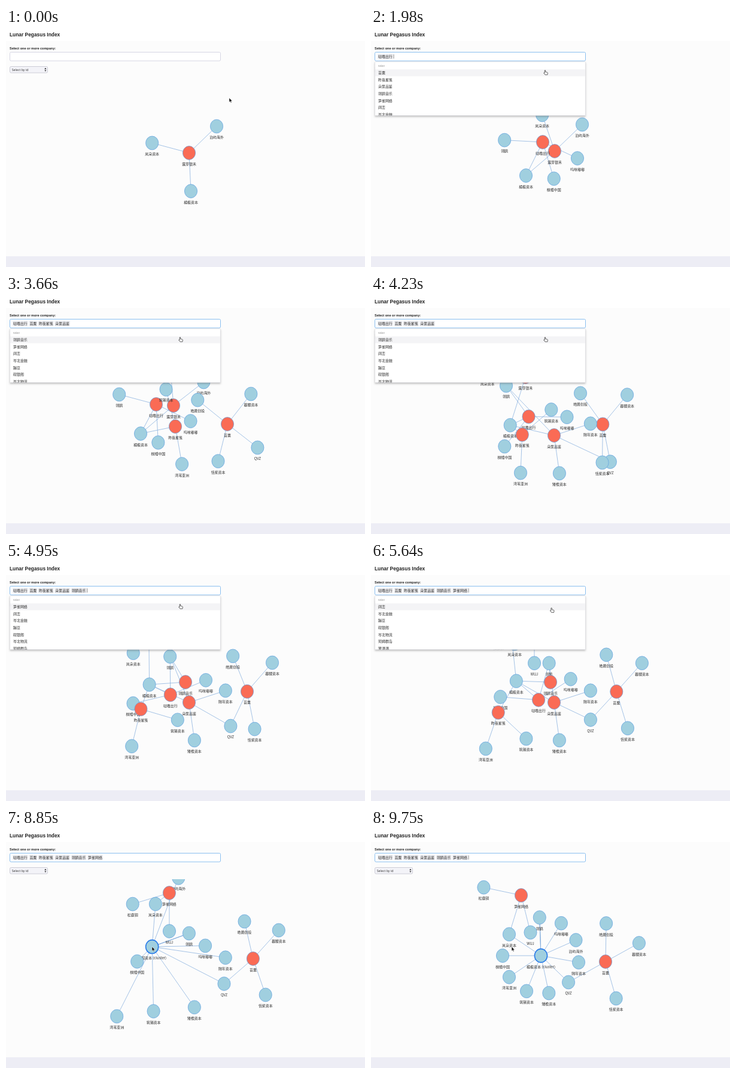
An HTML page that plays this animation: 600 px wide and 400 px high, repeating every 9780 ms.

```html
<!DOCTYPE html>
<html lang="en">
<head>
<meta charset="utf-8">
<title>Investor network</title>
<style>
html, body { margin: 0; width: 100%; height: 100%; overflow: hidden; background: #fcfcfc; }
svg { display: block; width: 600px; height: 400px; }
text { font: 5.95px "Noto Sans CJK SC", "Noto Sans CJK", "Noto Sans", sans-serif; fill: #2c2c2c; }
.title { font: bold 8.4px "Liberation Sans", sans-serif; fill: #222; }
.caption { font: bold 5.5px "Liberation Sans", sans-serif; fill: #222; }
.small { font-size: 4.3px; fill: #888; }
.select { font: 5.3px "Open Sans", "Noto Sans CJK SC", sans-serif; }
.label { text-anchor: middle; }
</style>
</head>
<body>
<svg viewBox="0 0 600 400">
  <defs>
    <clipPath id="view"><rect y="84" width="600" height="298"/></clipPath>
    <clipPath id="menuClip"><rect x="6" y="56" width="353" height="90.5"/></clipPath>
    <filter id="shadow" x="-5%" y="-5%" width="110%" height="120%">
      <feDropShadow dx="0" dy="2" stdDeviation="1.5" flood-color="#555" flood-opacity=".35"/>
    </filter>
  </defs>
  <rect width="600" height="400" fill="#fcfcfc"/>
  <rect width="600" height="22" fill="#fff"/>
  <rect y="382" width="600" height="18" fill="#ededf5"/>
  <text class="title" x="6" y="14.3">Lunar Pegasus Index</text>
  <text class="caption" x="6" y="36">Select one or more company:</text>
  <g clip-path="url(#view)"><g id="edges"></g><g id="nodes"></g></g>
  <rect x="6.5" y="64.5" width="63" height="10.5" rx="2" fill="#f3f3f8" stroke="#bcbcc8" stroke-width=".7"/>
  <text id="select" class="select" x="9.7" y="71.8"></text>
  <path d="M64.3 69l1.6-2.4 1.6 2.4zM64.3 70.4l1.6 2.4 1.6-2.4z" fill="#333"/>
  <rect id="field" x="6.5" y="40.5" width="352" height="14.5" rx="2" fill="#fff" stroke-width=".9"/>
  <g id="tokens"></g>
  <path id="caret" stroke="#444" stroke-width=".6"/>
  <g id="menu">
    <rect x="6.5" y="56.5" width="352" height="90" rx="1" fill="#fff" stroke="#d4d4d8" stroke-width=".6" filter="url(#shadow)"/>
    <rect x="7" y="69.3" width="351" height="11.4" fill="#f4f4f6"/>
    <text class="small" x="12" y="65.3">value</text>
    <g id="items" clip-path="url(#menuClip)"></g>
  </g>
  <path id="arrow" d="M0 0v7.2l1.7-1.5 1.1 2.5 1.2-.5-1.1-2.5h2.3z" fill="#111" stroke="#fff" stroke-width=".5"/>
  <path id="hand" d="M-.8 0q.8-.9 1.5 0v2.6l3 .7q.8.3.7 1.1l-.5 2.8h-4l-2.2-2.9q.1-1 1.5-.1z" fill="#fff" stroke="#222" stroke-width=".7"/>
</svg>
<script>
const LOOP = 9780, OPEN = 750, CLOSE = 5950, MERGE = 8850;
const CORE = "橘椴资本", CHOSEN = "苔粟";
const chosenSpan = [7200, 8250];
const picks = [1400, 2250, 2850, 3600, 4500, 5190];
const GRAPH_DELAY = 130, REACH = 64;

// The layout relaxes in phases of [start, end].
const phases = [[0, 1], [1530, 1980], [2380, 3660], [3730, 6900], [MERGE, 9700]];

const options = ["哒噜出行", "苔粟", "昨夜星笺", "朵筐品鉴", "翎鸥音乐", "笋雀网络", "阔峦",
  "岑北金融", "蹦豆", "砚银阁", "岑北物流", "珂姆群岛", "箩满满"];

// Hub positions and investor angles hold one value per phase, from birth on.
const companies = [
  ["露芽银禾", [[306, 209], [307, 206], [280, 185], [226, 66]],
    { 岚朵资本: [195, 251, 265, 68], 泊屿海外: [-44, -44, -38, 14] }, [CORE]],
  ["哒噜出行", [[287, 191], [251, 183], [282, 234]],
    { 翎鸥: [183, 195, 292], 棋幡中国: [73, 87, 191], 呜咪嘟嘟: [25, 26, -37] }, [CORE]],
  ["苔粟", [[370, 216], [413, 217], [392, 222]],
    { 皓蕨创投: [219, 257, 271], 暮鲤资本: [308, 312, 331], QVZ: [38, 139], 恬桨资本: [104, 71, 74] }, []],
  ["昨夜星笺", [[283, 220], [208, 254]],
    { 筑锡资本: [256, 413], 湾苇亚洲: [80, 111] }, [CORE]],
  ["朵筐品鉴", [[306, 235]], { 矮檐资本: [82], 隔年资本: [-18] }, [CORE, "翎鸥", "QVZ"]],
  ["翎鸥音乐", [[300, 201]], {}, [CORE, "翎鸥"]],
  ["笋雀网络", [[273, 107], [251, 111]], { 松鹿铜: [163, 192], WUJ: [90, 76] }, ["岚朵资本"]]
];
const corePath = [[309, 273], [259, 247], [225, 232], [244, 197], [284, 212]];
const survivors = [CHOSEN, "笋雀网络"];

// Clockwise order around the cluster.
const ring = ["翎鸥", "呜咪嘟嘟", "泊屿海外", "隔年资本", "QVZ", "矮檐资本", "筑锡资本",
  "湾苇亚洲", "棋幡中国", "岚朵资本"];
const ringAngle = name => -92 + 34 * ring.indexOf(name);

const $ = id => document.getElementById(id);
const clamp = u => Math.min(1, Math.max(0, u));
const easeOut = u => 1 - (1 - clamp(u)) ** 3;
const smooth = u => u * u * (3 - 2 * u);
const mix = (a, b, u) => Array.isArray(a) ? a.map((v, i) => mix(v, b[i], u)) : a + (b - a) * u;
const phaseAt = t => phases.findLastIndex(([start]) => start <= t);
const show = (el, on) => el.setAttribute("visibility", on ? "inherit" : "hidden");

function polar([x, y], degrees, radius) {
  const a = degrees * Math.PI / 180;
  return [x + radius * Math.cos(a), y + radius * Math.sin(a)];
}
function set(el, attrs) {
  for (const key in attrs) el.setAttribute(key, attrs[key]);
  return el;
}
function add(parent, tag, attrs, text = "") {
  const el = document.createElementNS("http://www.w3.org/2000/svg", tag);
  el.textContent = text;
  parent.append(set(el, attrs));
  return el;
}

const nodes = {}, edges = [];

function addNode(name, born, values, hub) {
  const group = add($("nodes"), "g", {});
  nodes[name] = {
    name, born, values, hub, group,
    isCompany: !hub && name !== CORE,
    disc: add(group, "ellipse", { rx: 10.6, ry: 11.4 }),
    label: add(group, "text", { class: "label", y: 20.6 }, name)
  };
}
addNode(CORE, 0, corePath);
companies.forEach(([hub, path, investors, known], i) => {
  const born = i ? picks[i - 1] + GRAPH_DELAY : 0;
  addNode(hub, born, path);
  for (const name in investors) addNode(name, born, investors[name], hub);
  for (const name of [...Object.keys(investors), ...known])
    edges.push({ hub, name, line: add($("edges"), "line", {}) });
});

const touches = (edge, test) => test(edge.hub) || test(edge.name);
const isChosen = name => name === CHOSEN;
const near = name => edges.some(e => touches(e, n => n === name) && touches(e, isChosen));
const second = name => edges.some(e => touches(e, n => n === name) && touches(e, near));
const absorbed = name => nodes[name].isCompany && !survivors.includes(name);

function track({ values, born }, t) {
  const k = phaseAt(t), first = phaseAt(born);
  const value = i => values[Math.min(Math.max(i - first, 0), values.length - 1)];
  const [start, end] = phases[k];
  return mix(value(k - 1), value(k), easeOut((t - start) / (end - start)));
}

function place(node, t) {
  if (!node.hub) return track(node, t);
  const grown = node.born ? easeOut((t - node.born) / 500) : 1;
  const home = polar(track(nodes[node.hub], t), track(node, t), REACH * mix(.4, 1, grown));
  if (t < MERGE || !ring.includes(node.name)) return home;
  const [start, end] = phases.at(-1);
  return mix(home, polar(corePath.at(-1), ringAngle(node.name), REACH),
    easeOut((t - start) / (end - start)));
}

function nodeStyle(node, merged, dim) {
  if (dim && isChosen(node.name)) return { fill: "#d2e5ff", stroke: "#2b7ce9", "stroke-width": .9 };
  if (dim && !near(node.name)) return { fill: "#dadada", stroke: "#d6d6d6", "stroke-width": .5 };
  const active = merged && node.name === CORE;
  return {
    fill: node.isCompany ? "#fa6b55" : "#a0cfdf",
    stroke: active ? "#2b7ce9" : "#5f9fe0",
    "stroke-width": active ? 1.6 : .7
  };
}

function edgeStyle(edge, dim) {
  if (dim && touches(edge, isChosen)) return { stroke: "#2f78d0", "stroke-width": 1.3 };
  if (dim && !touches(edge, near)) return { stroke: "#e6e6e6", "stroke-width": .7 };
  return { stroke: "#7fa9dc", "stroke-width": .7 };
}

function drawGraph(t) {
  const merged = t >= MERGE;
  const dim = t >= chosenSpan[0] && t < chosenSpan[1];
  for (const node of Object.values(nodes)) {
    node.at = place(node, t);
    show(node.group, t >= node.born && !(merged && absorbed(node.name)));
    set(node.group, { transform: `translate(${node.at})` });
    set(node.disc, nodeStyle(node, merged, dim));
    show(node.label, !dim || near(node.name) || second(node.name));
  }
  nodes[CORE].label.textContent = CORE + (merged ? " (cluster)" : "");
  for (const edge of edges) {
    const hub = merged && absorbed(edge.hub) ? CORE : edge.hub;
    const [x1, y1] = nodes[hub].at, [x2, y2] = nodes[edge.name].at;
    show(edge.line, t >= nodes[edge.hub].born && hub !== edge.name);
    set(edge.line, { x1, y1, x2, y2, ...edgeStyle(edge, dim) });
  }
  $("select").textContent = dim ? CHOSEN : "Select by id";
}

let tokenX = 12;
const tokens = picks.map((_, i) => {
  const group = add($("tokens"), "g", {});
  const width = options[i].length * 5.95;
  add(group, "rect", { x: tokenX - 1, y: 43.3, width: width + 2, height: 9, rx: 1, fill: "#efeff2" });
  add(group, "text", { x: tokenX, y: 49.8 }, options[i]);
  tokenX += width + 3.6;
  return { group, end: tokenX - 1.4 };
});
const rows = Array.from({ length: 7 }, (_, i) => add($("items"), "text", { x: 12, y: 77.1 + i * 11.6 }));

function drawForm(t) {
  const count = picks.filter(p => p <= t).length;
  const focused = t >= OPEN;
  set($("field"), { stroke: focused ? "#7db8ee" : "#d2d2e0" });
  tokens.forEach((token, i) => show(token.group, i < count));
  rows.forEach((row, i) => row.textContent = options[count + i]);
  show($("menu"), focused && t < CLOSE);
  const since = t - (count ? picks[count - 1] + 100 : OPEN);
  const x = count ? tokens[count - 1].end : 12;
  set($("caret"), { d: `M${x} 44.2v7` });
  show($("caret"), focused && since >= 0 && since % 1000 < 500);
}

// Pointer stops: arrival time and place.
const MOVE = 400;
const stops = [[0, 373, 117], [720, 291, 47], [1150, 291, 71], [5950, 372, 118],
  [7050, 416, 215], [8200, 345, 165], [8700, 244, 197], [9600, 235, 197]];

function drawPointer(t) {
  const i = stops.findLastIndex(([arrival]) => arrival <= t);
  const [, ...from] = stops[i];
  const [arrival, ...to] = stops[i + 1] ?? [LOOP + MOVE, ...from];
  const at = mix(from, to, smooth(clamp((t - arrival + MOVE) / MOVE)));
  const overMenu = t >= OPEN && t < CLOSE && at[0] < 359 && at[1] > 57 && at[1] < 147;
  show($("hand"), overMenu);
  show($("arrow"), !overMenu);
  set($(overMenu ? "hand" : "arrow"), { transform: `translate(${at})` });
}

const began = performance.now();
function frame() {
  const t = Math.max(0, performance.now() - began) % LOOP;
  drawGraph(t);
  drawForm(t);
  drawPointer(t);
  requestAnimationFrame(frame);
}
frame();
</script>
</body>
</html>
```
